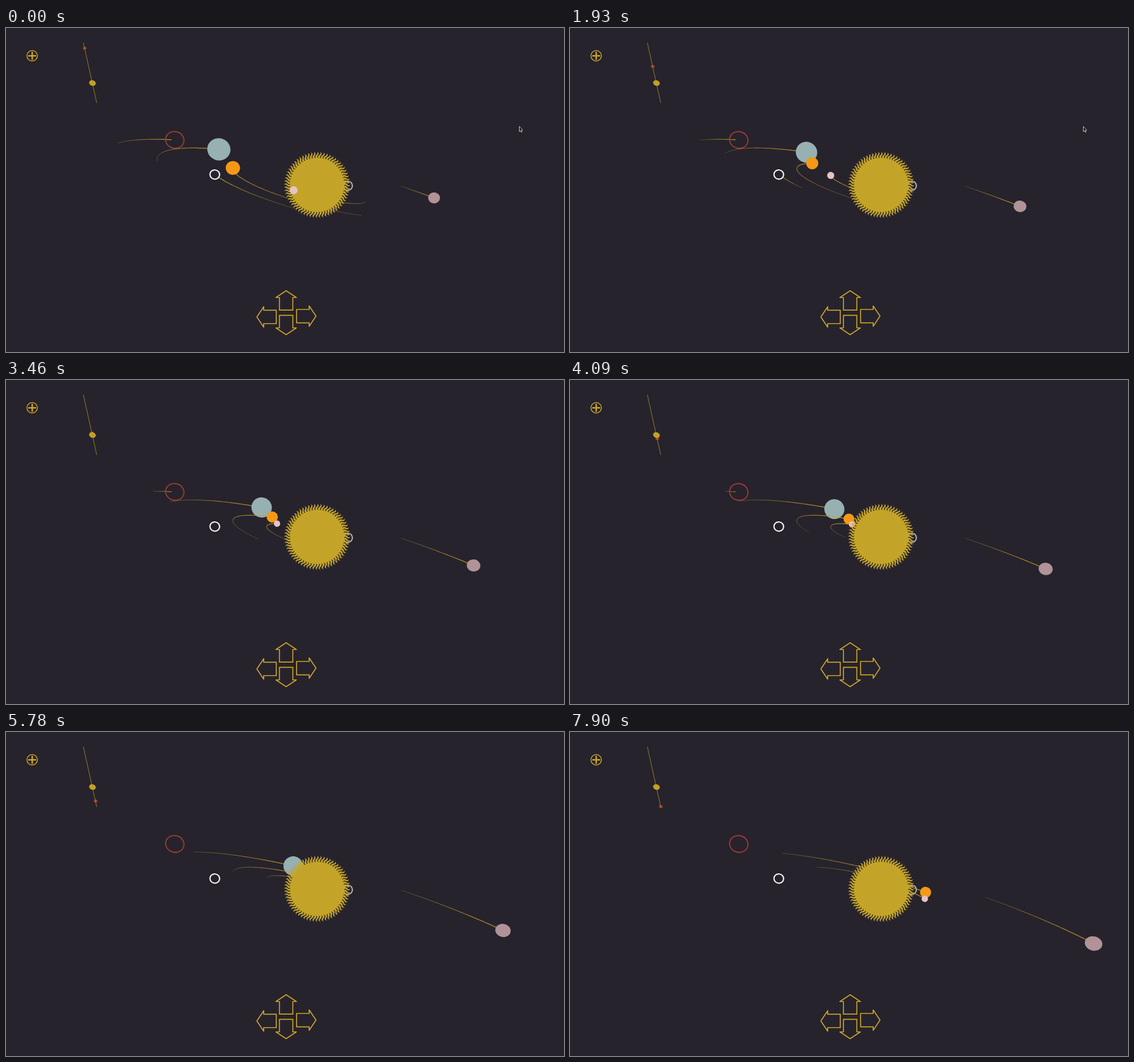
Animation, 981 px wide and 571 px high, one loop 8 s. Source, as an HTML page with a canvas:

```html
<!DOCTYPE html>
<html lang="en">
<head>
<meta charset="utf-8">
<title>Orbits</title>
<style>
html, body { margin: 0; width: 100%; height: 100%; overflow: hidden; background: #26232d; }
canvas { display: block; width: 981px; height: 571px; }
</style>
</head>
<body>
<canvas id="stage" width="981" height="571"></canvas>
<script>
const ctx = document.getElementById('stage').getContext('2d');
const LOOP = 8000, STEP = LOOP / 60;
const TAU = Math.PI * 2, DEG = TAU / 360;
const BG = '#26232d', GOLD = '#c4a428', LINE = '#d0a826';
const SUN = { x: 547, y: 276.5, r: 47.5, outer: 58.5, teeth: 64 };

// All orbits share one tilted, rolled plane seen in perspective
const VIEW = { roll: 15 * DEG, tilt: .178, depth: .00172, drop: 2.5 };

// orbit: radius, phase and speed in degrees (per second), trail in seconds;
// stop: when it came to rest, since: when its trail began
const STOP = -3.4;
const PLANETS = [
  { orbit: 412, phase: 317.3, speed: 4.77, trail: 9, size: 14.9, color: '#b09297', since: -2.9 },
  { orbit: 318, phase: 218.4, speed: 6.3, trail: 8.5, size: 17.9, color: '#9b3a34', ring: 2, stop: STOP },
  { orbit: 255, phase: 209.3, speed: 7.7, trail: 7.9, size: 24.3, color: '#97b0b2' },
  { orbit: 185, phase: 188.5, speed: 14.2, trail: 6.6, size: 6.6, color: '#f4f2f6', ring: 2.2, stop: STOP },
  { orbit: 146, phase: 165.5, speed: 18.25, trail: 5.7, size: 11.6, color: '#f59815' },
  { orbit: 89.4, phase: 111, speed: 28.9, trail: 3.5, size: 6, color: '#e6c3c4' }
];

function place(p, time) {
  const a = (p.phase + p.speed * Math.min(time, p.stop ?? time)) * DEG;
  const near = Math.sin(a);
  const scale = 1 / (1 - VIEW.depth * p.orbit * near);
  const u = p.orbit * Math.cos(a) * scale;
  const v = VIEW.drop + VIEW.tilt * p.orbit * near * scale;
  const c = Math.cos(VIEW.roll), s = Math.sin(VIEW.roll);
  return { x: SUN.x + u * c - v * s, y: SUN.y + u * s + v * c, scale, front: near > 0 };
}

function ellipse(x, y, rx, ry, tilt, color, line) {
  ctx.beginPath();
  ctx.ellipse(x, y, rx, ry, tilt, 0, TAU);
  ctx.fillStyle = ctx.strokeStyle = color;
  ctx.lineWidth = line || 1;
  if (line) ctx.stroke(); else ctx.fill();
}

// Thin line along the recent path, fading towards its tail
function trail(p, time, front) {
  const from = Math.max(time - p.trail, p.since ?? -Infinity);
  const to = Math.min(time, p.stop ?? time) - .25;
  if (from >= to) return;
  const parts = 60;
  const at = i => place(p, from + (to - from) * i / parts);
  ctx.strokeStyle = '#c9a222';
  for (let i = 0; i < parts; i++) {
    const a = at(i), b = at(i + 1), f = i / parts;
    if (a.front !== front) continue;
    ctx.globalAlpha = .35 + .6 * f;
    ctx.lineWidth = .8 + .6 * f;
    ctx.beginPath();
    ctx.moveTo(a.x, a.y);
    ctx.lineTo(b.x, b.y);
    ctx.stroke();
  }
  ctx.globalAlpha = 1;
}

// Bodies far from the centre are stretched outwards by the wide lens
function body(p, time, front) {
  const q = place(p, time);
  if (q.front !== front) return;
  const dx = q.x - SUN.x, dy = q.y - SUN.y;
  const stretch = 1 + (dx * dx + dy * dy) / 1.3e6, r = p.size * q.scale;
  ellipse(q.x, q.y, r * stretch, r / stretch, Math.atan2(dy, dx), p.color, p.ring);
}

function planets(time, front) {
  for (const p of PLANETS) {
    trail(p, time, front);
    body(p, time, front);
  }
}

function sun() {
  ellipse(SUN.x, SUN.y, SUN.r, SUN.r, 0, GOLD);
  const from = SUN.r - 1, size = SUN.outer - from, N = 10;
  for (let i = 0; i < SUN.teeth; i++) {
    ctx.save();
    ctx.translate(SUN.x, SUN.y);
    ctx.rotate(i / SUN.teeth * TAU);
    ctx.beginPath();
    for (let j = -N; j <= N; j++) {
      const k = 1 - Math.abs(j) / N;
      const half = 1.75 * (1 - k ** 3) * Math.sign(j);
      ctx.lineTo(from + size * k, half - 1.7 * Math.sin(TAU * k));
    }
    ctx.fill();
    ctx.restore();
  }
}

// The same system seen edge-on: a dot swinging along a line
function minimap(time) {
  const c = Math.cos((24.9 + 18.25 * time) * DEG);
  const y = -46.9 * c / (1 - .34 * c);
  ellipse(152 + y * .222, 97 + y, 3.2, 2.6, 0, '#a53b2f');
  ctx.strokeStyle = '#a88b27';
  ctx.lineWidth = .9;
  ctx.beginPath();
  ctx.moveTo(136, 26);
  ctx.lineTo(159.5, 132);
  ctx.stroke();
  ellipse(152, 97, 6, 4.8, .35, '#c4a023');
}

function outline(...points) {
  ctx.beginPath();
  for (const [x, y] of points) ctx.lineTo(x, y);
  ctx.closePath();
}

function arrow(x, y, turn) {
  ctx.save();
  ctx.translate(x, y);
  ctx.rotate(turn * TAU / 4);
  outline([0, 0], [18, 12], [11.8, 12], [11.8, 34.2], [-11.8, 34.2], [-11.8, 12], [-18, 12]);
  ctx.stroke();
  ctx.restore();
}

function controls() {
  ellipse(46, 49, 9.2, 9.2, 0, LINE, 1.5);
  ctx.fillRect(39, 47.8, 14, 2.5);
  ctx.fillRect(44.8, 42, 2.5, 14);
  ctx.lineWidth = 1.7;
  ctx.lineJoin = 'round';
  arrow(492.5, 463, 0);
  arrow(545, 507.8, 1);
  arrow(492.5, 540.5, 2);
  arrow(441, 509.2, 3);
}

// Rests, slips to the right, then leaves
function pointer(time) {
  if (time > 2.2) return;
  ctx.save();
  ctx.translate(time < 2.05 ? 902.5 : 944, 173.5);
  outline([0, 0], [0, 9], [2, 7.2], [3.5, 10.3], [4.8, 9.7], [3.5, 6.7], [5.8, 6.3]);
  ctx.fillStyle = '#111';
  ctx.fill();
  ctx.strokeStyle = '#ddd';
  ctx.lineWidth = .9;
  ctx.stroke();
  ctx.restore();
}

function draw(time) {
  ctx.fillStyle = BG;
  ctx.fillRect(0, 0, 981, 571);
  minimap(time);
  ellipse(601, 278, 8, 8, 0, '#b0afb4', 2.2);
  planets(time, false);
  sun();
  planets(time, true);
  controls();
  pointer(time);
}

const start = performance.now();
function tick() {
  const now = (performance.now() - start) % LOOP;
  draw(Math.floor(now / STEP) * STEP / 1000);
  requestAnimationFrame(tick);
}
tick();
</script>
</body>
</html>
```
